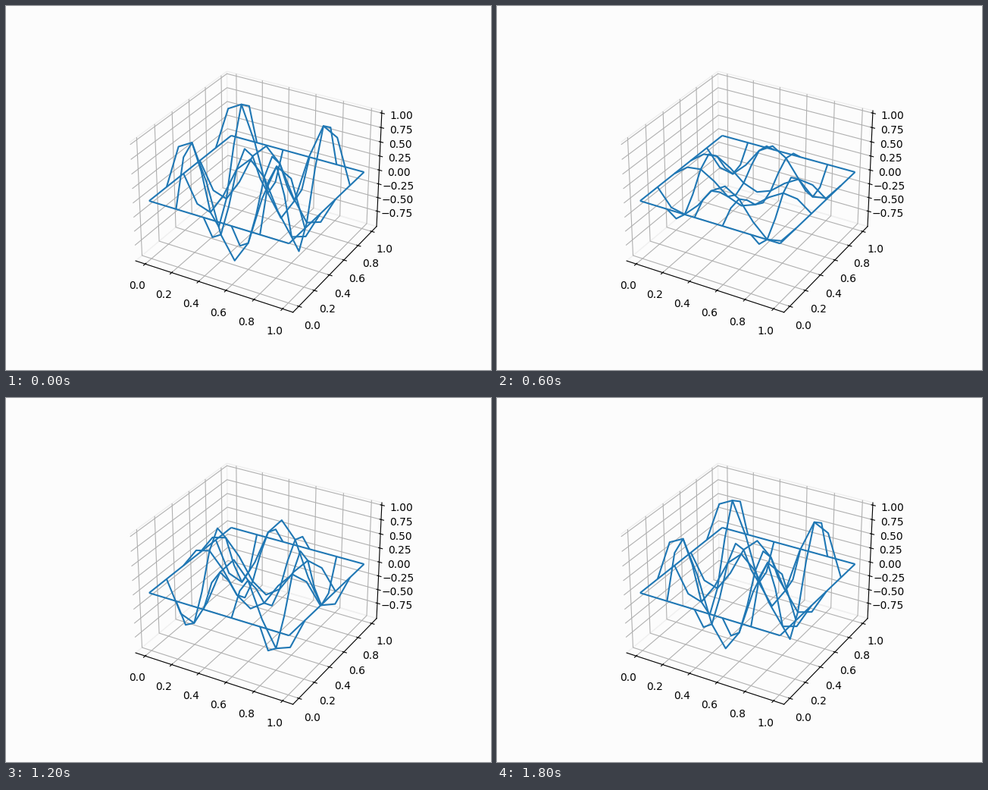
Write a matplotlib script that moves like this. It is 640 px wide and 480 px high and loops after 2 s.

```python
import numpy as np
import matplotlib.pyplot as plt
from matplotlib.animation import FuncAnimation

FRAMES, STEP_MS = 10, 200
PAPER, PANE_EDGE = "#fcfcfc", "#efefef"
MODE = 3          # half waves along each side
CELLS = 10
COURANT = 0.5

# Phase advance per time step of the discrete wave equation on the square grid
PHASE = 2 * np.arcsin(COURANT * np.sqrt(2) * np.sin(MODE * np.pi / (2 * CELLS)))

side = np.linspace(0, 1, CELLS + 1)
X, Y = np.meshgrid(side, side)
SHAPE = np.sin(MODE * np.pi * X) * np.sin(MODE * np.pi * Y)


def padded(low, high, part=1 / 48):
    pad = (high - low) * part
    return low - pad, high + pad


fig = plt.figure(figsize=(6.4, 4.8), dpi=100, facecolor=PAPER)
ax = fig.add_subplot(projection="3d")
ax.set_facecolor(PAPER)
for axis in (ax.xaxis, ax.yaxis, ax.zaxis):
    axis.set_pane_color(PANE_EDGE)
    axis.pane.set_facecolor("none")

ax.set_xlim(*padded(-0.05, 1.05))
ax.set_ylim(*padded(-0.05, 1.05))
ax.set_zlim(*padded(np.cos(5 * PHASE), 1))
ax.set_zticks(np.arange(-0.75, 1.01, 0.25))

wires = []


def draw(i):
    while wires:
        wires.pop().remove()
    height = SHAPE * np.cos(i * PHASE)
    wires.append(ax.plot_wireframe(X, Y, height, rstride=2, cstride=2))
    return wires


anim = FuncAnimation(fig, draw, frames=FRAMES, init_func=lambda: draw(0),
                     interval=STEP_MS, repeat=True, repeat_delay=0)
plt.show()
```
